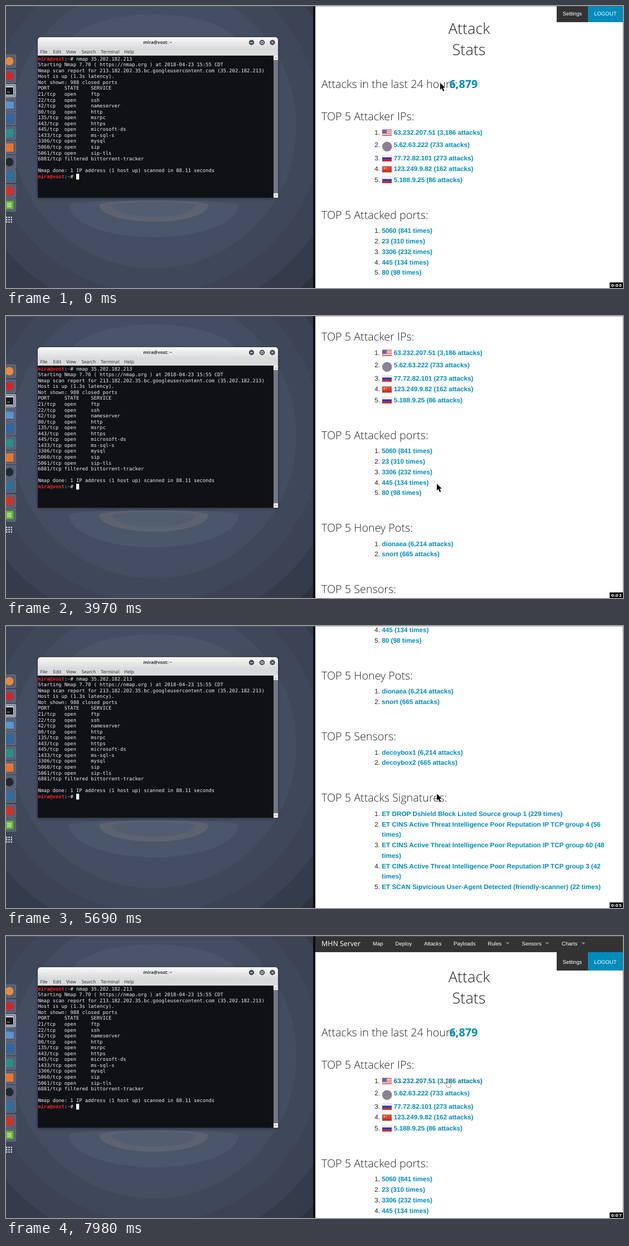
Recreate the animation shown at these times as an HTML page with a canvas. Size 1107 px wide and 506 px high, loop 8000 ms.

```html
<!DOCTYPE html>
<html lang="en">
<head>
<meta charset="utf-8">
<title>Attack stats</title>
<style>
html, body { margin: 0; width: 100%; height: 100%; overflow: hidden; background: #fff; }
canvas { display: block; width: 1107px; height: 506px; }
</style>
</head>
<body>
<canvas id="stage"></canvas>
<script>
const W = 1107, H = 506, LOOP = 8000;
const SANS = '"Liberation Sans", Arial, sans-serif';
const OPEN = '"Open Sans", sans-serif';
const MONO = '"DejaVu Sans Mono", monospace';
const LINK = '#008cba', INK = '#222';
const dpr = window.devicePixelRatio || 1;

function setup(canvas) {
  canvas.width = W * dpr;
  canvas.height = H * dpr;
  const c = canvas.getContext('2d');
  c.scale(dpr, dpr);
  c.textRendering = 'geometricPrecision';
  return c;
}
const desktop = document.createElement('canvas');
const stage = setup(document.getElementById('stage'));
let ctx = setup(desktop);

const spread = (from, to, n) => Array.from({ length: n }, (_, i) => from + (to - from) * i / (n - 1));
const TICKS = [
  0, ...spread(840, 1800, 8), 1900, 2050, 2190, 2320, ...spread(2600, 3540, 8),
  3740, 3840, 3970, 4070, 4270, 4470, 4670,
  4800, 4980, 5130, 5270, 5410, 5550, 5690, 5830,
  5950, 6080, 6200, 6320, 6450, 6590, 6730, 6870, 7270, 7700, 7840, 7980
];
const SECONDS = [977, 1900, 2870, 4070, 5130, 6200, 7270];
const SCROLL = [
  [2470, 33], [3540, 128], [3970, 194], [4980, 408], [5410, 472], [5550, 485.5],
  [5690, 485.5], [5830, 420], [5950, 335], [6320, 115.5], [6590, 33], [6870, 0]
];
const POINTER = [
  [0, 779, 138], [840, 770, 143], [1115, 753, 150], [1390, 772, 125], [1663, 806, 95],
  [1800, 820, 79], [1900, 820, 79], [2050, 735, 165], [2190, 650, 250], [2320, 773, 301],
  [7270, 773, 301], [7700, 779, 287], [7840, 789, 265], [7980, 793, 256.5]
];

function along(keys, t) {
  if (t <= keys[0][0]) return keys[0].slice(1);
  const i = keys.findIndex(k => k[0] > t);
  if (i < 0) return keys[keys.length - 1].slice(1);
  const a = keys[i - 1], b = keys[i], p = (t - a[0]) / (b[0] - a[0]);
  return a.slice(1).map((v, j) => v + (b[j + 1] - v) * p);
}

function rect(x, y, w, h, color) {
  ctx.fillStyle = color;
  ctx.fillRect(x, y, w, h);
}
function round(x, y, w, h, r, color) {
  ctx.fillStyle = color;
  ctx.beginPath();
  ctx.roundRect(x, y, w, h, r);
  ctx.fill();
}
function disc(x, y, r, color) {
  ctx.fillStyle = color;
  ctx.beginPath();
  ctx.arc(x, y, r, 0, Math.PI * 2);
  ctx.fill();
}
function poly(points, color) {
  ctx.fillStyle = color;
  ctx.beginPath();
  points.forEach(([x, y]) => ctx.lineTo(x, y));
  ctx.closePath();
  ctx.fill();
}
function text(s, x, y, font, color, align = 'left') {
  ctx.font = font;
  ctx.fillStyle = color;
  ctx.textAlign = align;
  ctx.fillText(s, x, y);
}
function fade(y0, y1, ...colors) {
  const g = ctx.createLinearGradient(0, y0, 0, y1);
  colors.forEach((c, i) => g.addColorStop(i / (colors.length - 1), c));
  return g;
}
function lens(y, rx, up, down, color) {
  ctx.fillStyle = color;
  ctx.beginPath();
  ctx.ellipse(265, y, rx, down, 0, 0, Math.PI);
  ctx.ellipse(265, y, rx, up, 0, Math.PI, Math.PI * 2);
  ctx.fill();
}

function wallpaper() {
  ctx.save();
  ctx.beginPath();
  ctx.rect(0, 0, 551, H);
  ctx.clip();
  rect(0, 0, 551, H, '#2d323d');
  const rings = [[392, '#343b4a'], [346, '#3b4355'], [300, '#3f485a'], [256, '#444d61']];
  for (const [r, color] of rings) disc(265, 215, r, color);
  lens(73, 152, 58, 9, '#4b5468');
  lens(357, 152, 9, 58, '#4c566a');
  lens(357, 98, 8, 30, '#5c6270');
  lens(358, 75, 7, 20, '#525d72');
  ctx.restore();
  rect(551, 0, 4, H, '#0b0b0d');
}

function dock() {
  const icons = [
    [99, 'disc', '#e98a3b'], [126, 'disc', '#d6232b'], [152, 'term', '#15171b'],
    [177, 'folder', '#5b93cf'], [202, 'box', '#2f66a5'], [228, 'box', '#2a8f86'],
    [254, 'box', '#e8752c'], [280, 'disc', '#23282e'], [305, 'box', '#2d6f9f'],
    [332, 'box', '#cf3327'], [357, 'note', '#63b52f']
  ];
  for (const [y, kind, color] of icons) {
    round(-6, y - 12, 24, 24, 3, kind === 'term' ? '#aab0ba' : '#687286');
    round(-6, y - 11, 23, 22, 3, kind === 'term' ? '#8b93a1' : '#566075');
    if (kind === 'disc') disc(6, y, 7.5, color);
    else if (kind === 'term') {
      round(-4, y - 8, 18, 16, 2, '#d5d8dc');
      rect(-4, y - 6, 17, 13, color);
      text('_', 2, y + 1, 'bold 8px ' + MONO, '#eee');
    } else if (kind === 'folder') {
      rect(-2, y - 7, 9, 4, '#4278b5');
      round(-2, y - 5, 16, 12, 1, color);
    } else {
      round(-2, y - 7.5, 15.5, 15, 1, color);
      if (kind === 'note') for (let i = -1; i < 2; i++) rect(2, y + i * 3 - .5, 8, 1.3, '#eef7e6');
    }
  }
  for (let i = 0; i < 9; i++) rect(i % 3 * 4.3, 378 + Math.floor(i / 3) * 4.2, 2.4, 2.4, '#d9dce2');
}

const OUTPUT = [
  'Starting Nmap 7.70 ( https://nmap.org ) at 2018-04-23 15:55 CDT',
  'Nmap scan report for 213.182.202.35.bc.googleusercontent.com (35.202.182.213)',
  'Host is up (1.3s latency).',
  'Not shown: 988 closed ports',
  'PORT     STATE    SERVICE',
  ...['21 open ftp', '22 open ssh', '42 open nameserver', '80 open http', '135 open msrpc',
    '443 open https', '445 open microsoft-ds', '1433 open ms-sql-s', '3306 open mysql',
    '5060 open sip', '5061 open sip-tls', '6881 filtered bittorrent-tracker'].map(row => {
    const [port, state, service] = row.split(' ');
    return (port + '/tcp').padEnd(9) + state.padEnd(9) + service;
  }),
  '',
  'Nmap done: 1 IP address (1 host up) scanned in 88.11 seconds'
];

function terminal() {
  const font = '8.77px ' + MONO, cw = 5.28, x0 = 57.3;
  const lineY = i => 97.7 + i * 10.55;
  const prompt = (i, command) => {
    const put = (s, col, color, bold) => text(s, x0 + col * cw, lineY(i), (bold ? 'bold ' : '') + font, color);
    put('mira@vost', 0, '#ec2a2a', true);
    put(':', 9, '#eee');
    put('~', 10, '#5b7fd0', true);
    put('# ' + command, 11, '#eee');
  };
  ctx.save();
  ctx.shadowColor = 'rgba(0,0,0,.4)';
  ctx.shadowBlur = 5 * dpr;
  ctx.shadowOffsetY = dpr;
  round(57, 56, 431, 288, [5, 5, 0, 0], '#101116');
  ctx.restore();
  round(57, 56, 431, 33, [5, 5, 0, 0], fade(56, 76, '#fafafa', '#e9e9ea', '#d9dadb'));
  rect(57, 75, 431, 14, '#d9dadb');
  text('mira@vost: ~', 272, 68.4, 'bold 8px ' + OPEN, '#33373d', 'center');
  const menu = [['File', 61.5], ['Edit', 84.5], ['View', 108], ['Search', 135.5], ['Terminal', 170], ['Help', 212]];
  for (const [label, x] of menu) text(label, x, 84.8, '8.2px ' + OPEN, '#22252a');

  for (const x of [440.5, 459.5, 478]) disc(x, 65.5, 4.7, '#434b59');
  rect(438.2, 65, 4.6, 1.2, '#f0f0f0');
  ctx.strokeStyle = '#f0f0f0';
  ctx.lineWidth = 1;
  ctx.strokeRect(457.7, 63.8, 3.6, 3.4);
  ctx.beginPath();
  ctx.moveTo(476.3, 63.8); ctx.lineTo(479.7, 67.2);
  ctx.moveTo(479.7, 63.8); ctx.lineTo(476.3, 67.2);
  ctx.stroke();

  rect(57, 89, 423, 255, '#101116');
  rect(480, 89, 8, 255, '#73777f');
  rect(480, 89, 8, 8, '#f1f1f1');
  rect(480, 336, 8, 8, '#f1f1f1');
  poly([[482, 94.5], [486, 94.5], [484, 92]], '#999');
  poly([[482, 339], [486, 339], [484, 341.5]], '#999');

  prompt(0, 'nmap 35.202.182.213');
  OUTPUT.forEach((line, i) => text(line, x0, lineY(i + 1), font, '#eee'));
  prompt(20, '');
  rect(126, 301, 5.2, 10.4, '#fff');
}

const heading = (s, mid) => text(s, 566, mid + 7, '300 19.78px ' + OPEN, INK);
function item(n, s, mid, x = 674.3, color = LINK) {
  if (n) text(n + '.', 671, mid + 3.8, '11.72px ' + SANS, INK, 'right');
  text(s, x, mid + 3.8, 'bold 11.72px ' + SANS, color);
}
function list(rows, mid) {
  let n = 0;
  rows.forEach((s, i) => item(s === 'times)' ? 0 : ++n, s, mid + i * 18.75));
}

function flag(kind, mid) {
  const x = 675, y = mid - 5.2, w = 17, h = 11;
  if (kind === 'us') {
    for (let i = 0; i < 7; i++) rect(x, y + i * h / 7, w, h / 7, i % 2 ? '#f6eeee' : '#d8474b');
    rect(x, y, 8, h * 4 / 7, '#5a6cae');
  } else if (kind === 'ru') {
    ['#f8f8f8', '#2436c8', '#d8202a'].forEach((c, i) => rect(x, y + i * h / 3, w, h / 3 + .05, c));
  } else {
    rect(x, y, w, h, fade(y, y + h, '#e2594c', '#c9281f'));
    disc(x + 3.8, y + 3.6, 1.5, '#f3cf4a');
    for (let i = 0; i < 3; i++) disc(x + 7.4, y + 1.8 + i * 1.9, .6, '#f3cf4a');
  }
  ctx.strokeStyle = 'rgba(60,60,60,.3)';
  ctx.lineWidth = .6;
  ctx.strokeRect(x, y, w, h);
}

const ATTACKERS = [
  ['us', '63.232.207.51 (3,186 attacks)', 260],
  ['disc', '5.62.63.222 (733 attacks)', 282.2],
  ['ru', '77.72.82.101 (273 attacks)', 306],
  ['cn', '123.249.9.82 (162 attacks)', 325.6],
  ['ru', '5.188.9.25 (86 attacks)', 345]
];
const MENU = [['Map', 658], ['Deploy', 698.5], ['Attacks', 750], ['Payloads', 803],
  ['Rules', 864.5, 900], ['Sensors', 925.5, 971], ['Charts', 997, 1036]];

function navbar() {
  const font = '9.6px ' + SANS;
  rect(555, -4, 552, 33, '#333');
  text('MHN Server', 566, 17.5, '12.45px ' + OPEN, '#fff');
  for (const [label, x, arrow] of MENU) {
    text(label, x, 16.6, font, '#fff');
    if (arrow) poly([[arrow - 3.6, 11.4], [arrow + 3.6, 11.4], [arrow, 15.2]], '#858585');
  }
  rect(988, 29, 56, 33, '#333');
  rect(1044, 29, 63, 33, LINK);
  text('Settings', 1016, 49.6, font, '#fff', 'center');
  text('LOGOUT', 1075.3, 49.6, font, '#fff', 'center');
}

function page(scroll, hover) {
  ctx.save();
  ctx.beginPath();
  ctx.rect(555, 0, 552, H);
  ctx.clip();
  rect(555, 0, 552, H, '#fff');
  ctx.translate(0, -scroll);
  navbar();
  text('Attack', 831, 83, '300 27.1px ' + OPEN, INK, 'center');
  text('Stats', 830.5, 120.5, '300 27.1px ' + OPEN, INK, 'center');
  heading('Attacks in the last 24 hours:', 173);
  text('6,879', 795.5, 180, 'bold 19.78px ' + OPEN, LINK);

  heading('TOP 5 Attacker IPs:', 231);
  ATTACKERS.forEach(([kind, label, y], i) => {
    if (kind === 'disc') disc(683.7, y + 3, 8.8, '#8a8294');
    else flag(kind, y);
    item(i + 1, label, y, 695.8, hover && !i ? '#0078a0' : LINK);
  });

  heading('TOP 5 Attacked ports:', 407.6);
  list(['5060 (841 times)', '23 (310 times)', '3306 (232 times)', '445 (134 times)', '80 (98 times)'], 436.5);
  heading('TOP 5 Honey Pots:', 574);
  list(['dionaea (6,214 attacks)', 'snort (665 attacks)'], 602.8);
  heading('TOP 5 Sensors:', 683.6);
  list(['decoybox1 (6,214 attacks)', 'decoybox2 (665 attacks)'], 712.4);
  heading('TOP 5 Attacks Signatures:', 793.8);
  const poor = 'ET CINS Active Threat Intelligence Poor Reputation IP TCP group ';
  list([
    'ET DROP Dshield Block Listed Source group 1 (229 times)',
    poor + '4 (56', 'times)', poor + '60 (48', 'times)', poor + '3 (42', 'times)',
    'ET SCAN Sipvicious User-Agent Detected (friendly-scanner) (22 times)'
  ], 822.6);
  ctx.restore();
}

function pointer([x, y], hand) {
  ctx.save();
  ctx.translate(x, y);
  ctx.lineJoin = 'round';
  const path = new Path2D(hand
    ? 'M-1.2 1Q0-.6 1.2 1V5.4L4.8 6.4Q5.6 6.8 5.4 9L4.4 12V14.5H-2V12.4L-4.6 8.4Q-4.8 6.8-3.2 7.4L-1.2 9Z'
    : 'M0 0V12.2L2.8 9.6L5.2 15L7.4 14L5 8.8H8.8Z');
  ctx.lineWidth = hand ? 1 : 1.2;
  ctx.strokeStyle = hand ? '#111' : '#fff';
  ctx.fillStyle = hand ? '#fff' : '#000';
  ctx.stroke(path);
  ctx.fill(path);
  if (hand) {
    ctx.lineWidth = .7;
    ctx.stroke(new Path2D('M1.2 5.4V8M3.2 6V8.2'));
  }
  ctx.restore();
}

function clock(t) {
  const sec = SECONDS.filter(s => t >= s).length;
  rect(1083, 496, 24, 10, '#000');
  const at = [1088.2, 1092.3, 1096.3, 1102.2];
  ('0:0' + sec).split('').forEach((c, i) =>
    text(c, at[i], 503.6, 'bold 7px "DejaVu Sans", sans-serif', '#fff', 'center'));
}

// The desktop never changes, so it is painted once
wallpaper();
dock();
terminal();
ctx = stage;

function draw() {
  const now = performance.now() % LOOP;
  const t = TICKS.filter(tick => tick <= now).pop();
  const hover = t >= 7840;
  ctx.drawImage(desktop, 0, 0, W, H);
  page(along(SCROLL, t)[0], hover);
  rect(0, 0, W, 1, 'rgba(110,115,122,.55)');
  rect(1106, 0, 1, H, 'rgba(110,115,122,.4)');
  pointer(along(POINTER, t), hover);
  clock(t);
  requestAnimationFrame(draw);
}
draw();
</script>
</body>
</html>
```
